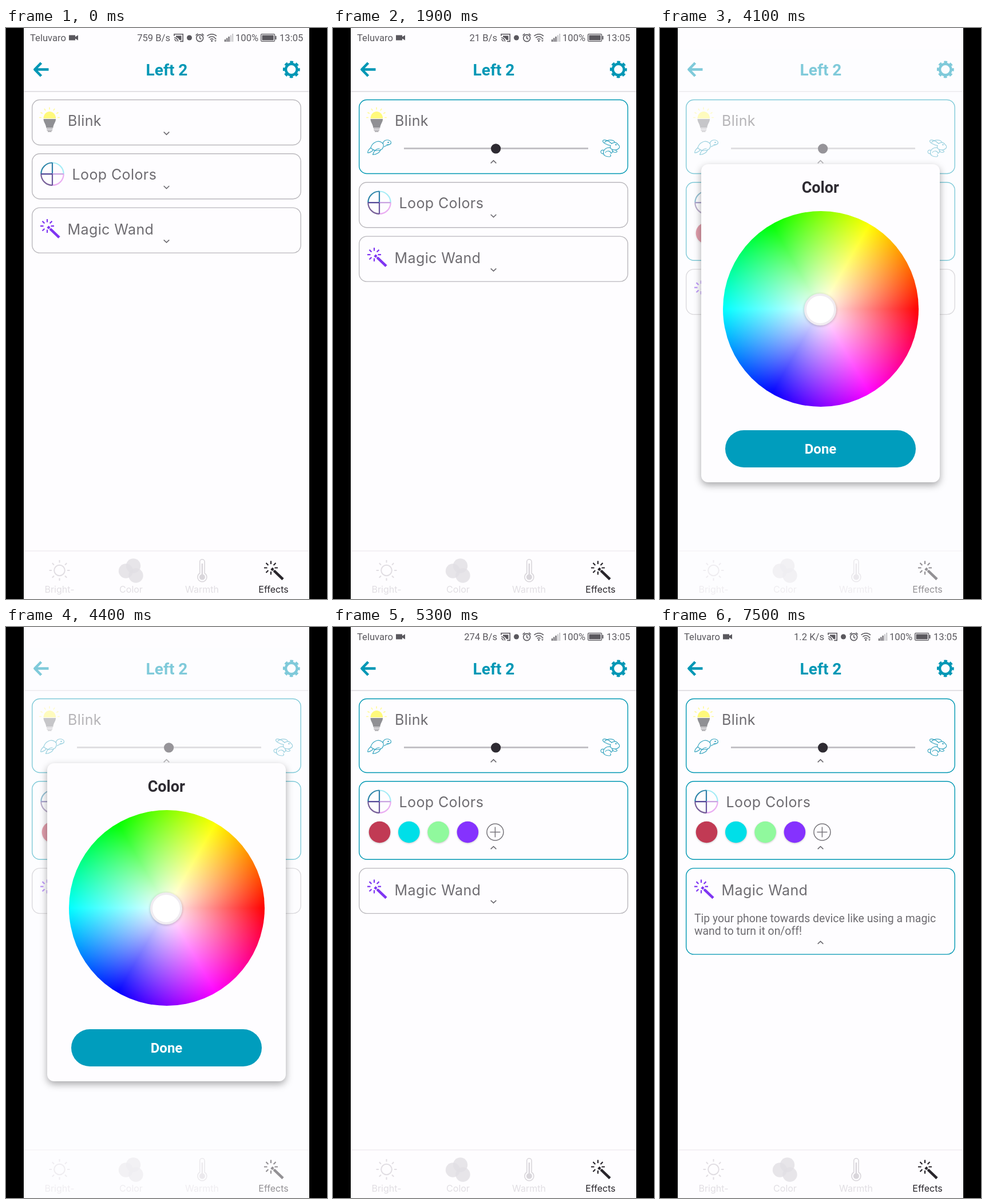
An HTML page that plays this animation: 561x998 px, repeating every 8.6 s.

```html
<!DOCTYPE html>
<html lang="en">
<head>
<meta charset="utf-8">
<title>Light effects</title>
<style>
html, body { margin: 0; width: 100%; height: 100%; overflow: hidden; background: #000; }
#stage { position: absolute; left: 0; top: 0; width: 561px; height: 998px; overflow: hidden; }
svg { position: absolute; left: 0; top: 0; display: block; }
text, #modal { font-family: Roboto, sans-serif; }
.wide { font-family: Inter, sans-serif; }
.line { fill: none; stroke: currentColor; }
.round { stroke-linecap: round; stroke-linejoin: round; }
.title { font-size: 25px; letter-spacing: .4px; fill: #6e6c71; }
.teal { color: #0097b5; }
.off { color: #e1dee3; }
.tab { font-size: 16px; text-anchor: middle; fill: currentColor; }
.bar { font-size: 16.6px; fill: #5a585e; }
#modal { position: absolute; left: 31px; top: 0; width: 499px; height: 998px; background: rgba(254,253,255,.5); }
#modal div { position: absolute; box-sizing: border-box; }
.cover { left: 0; top: 0; width: 499px; height: 36px; background: #fefdff; }
.sheet { left: 41px; top: 238px; width: 416.5px; height: 555.5px; border-radius: 12px; background: #fefdff; box-shadow: 0 5px 13px rgba(0,0,0,.34); }
.head { left: 0; top: 25px; width: 100%; text-align: center; font: bold 27px/32px Roboto, sans-serif; color: #2e2b32; }
.wheel { left: 38px; top: 81.5px; width: 342px; height: 342px; border-radius: 50%;
  background: radial-gradient(circle closest-side, #fff, rgba(255,255,255,0)),
    conic-gradient(from 90deg, #f00, #f0f, #00f, #0ff, #0f0, #ff0, #f00); }
#knob { width: 56px; height: 56px; border-radius: 50%; border: 4px solid #f0ecf1; box-shadow: 0 1px 4px rgba(0,0,0,.25); }
.done { left: 42px; top: 465px; width: 333px; height: 65px; border-radius: 33px; background: #009dbd; color: #fff;
  text-align: center; font: bold 24px/67px Roboto, sans-serif; }
</style>
</head>
<body>
<div id="stage">
<svg width="561" height="998" viewBox="0 0 561 998">
  <defs>
    <g id="wand" class="line">
      <g id="sparks" stroke-width="2.2"></g>
      <path d="M1 1L4 4M5.5 5.2L21 20" stroke-width="4.6"/>
    </g>
  </defs>
  <rect x="31" width="499" height="998" fill="#fefdff"/>

  <g class="bar" color="#5a585e">
    <text x="42" y="23">Teluvaro</text>
    <path d="M110 12.5h11v3l5-3v9l-5-3v3h-11z"/>
    <text id="rate" x="287" y="23" text-anchor="end"></text>
    <path class="line" stroke-width="1.6" d="M294 14v-3.2h15.2v12.6h-5M294 17a6.5 6.5 0 0 1 6.5 6.5M294 20.2a3.4 3.4 0 0 1 3.4 3.4"/>
    <path d="M297 13.5h9.5v7.5h-3.5a9 9 0 0 0-6-5z"/>
    <circle cx="320.5" cy="17" r="4.5"/>
    <g class="line" stroke-width="1.6">
      <circle cx="338.7" cy="17.6" r="6"/>
      <path d="M338.7 14v4l2.7 1.6M331.6 13l3.6-3.2M345.8 13l-3.6-3.2"/>
      <path d="M351.5 14a12 12 0 0 1 16.5 0M354.2 17.2a8 8 0 0 1 11 0M356.8 20.2a4 4 0 0 1 5.8 0"/>
    </g>
    <circle cx="359.7" cy="22.6" r="1.5"/>
    <path d="M366 17l2 2.6h-4zM366 24l2-2.6h-4z"/>
    <path d="M382 20h2v4h-2zM385.3 17.5h2v6.5h-2zM388.6 15h2v9h-2z"/>
    <path d="M391.9 12.5h2v11.5h-2zM395.2 10h2v14h-2z" opacity=".35"/>
    <text x="401" y="23">100%</text>
    <rect class="line" x="445.6" y="10.7" width="24" height="12.6" rx="1.5" stroke-width="1.3"/>
    <path d="M447.5 12.6h20.2v8.8h-20.2zM470.5 14h2v6h-2z"/>
    <text x="478" y="23">13:05</text>
  </g>

  <g class="teal">
    <path class="line" stroke-width="4.6" stroke-linejoin="round" d="M74.5 72.5H51M61.5 61L50.3 72.5L61.5 84"/>
    <text x="281" y="83" text-anchor="middle" font-size="28" font-weight="bold" fill="currentColor">Left 2</text>
    <g class="line" transform="translate(498.8 72.5)">
      <circle r="9.8" stroke-width="4.4"/>
      <circle r="12.8" stroke-width="4.2" stroke-dasharray="5.55 4.5" stroke-dashoffset="2.78"/>
    </g>
  </g>
  <path d="M31 111h499" stroke="#dad8dd" stroke-width="1.6"/>

  <g class="card">
    <rect/>
    <g stroke="#fffa9a" stroke-width="1.6" id="rays" transform="translate(76 31)"></g>
    <path d="M65.5 32.5a10.8 12 0 0 1 21.6 0z" fill="#fff97c"/>
    <path d="M65.5 33.5h21.6c0 6-4.4 9-4.8 15.5h-12c-.4-6.500-4.800-9.500-4.800-15.500z" fill="#909094"/>
    <path d="M71 50.800h10.500M71.500 53.200h9.500M73 55.400h6.500" stroke="#a9a8ac" stroke-width="1.600"/>
    <text class="wide title" x="108" y="45.5">Blink</text>
    <g class="more">
      <path d="M124 85h322" stroke="#c3c1c6" stroke-width="3"/>
      <circle cx="284.6" cy="85.4" r="8.6" fill="#2e2b32"/>
      <g class="line round" color="#3aa6c0" stroke-width="1.2">
        <path d="M66 84C68 75 78 70 85 74.500C89 77 89.500 82 85.500 86.500C79 90 71 89.500 66 84z"/>
        <path d="M66 84c-3 2-5 5-5.500 8.500c4 .5 7-2 9.500-4.500M81 85c-6 1-10 5-11.500 11c7-.5 12-4 14-9"/>
        <path d="M87.500 77c-.5-5 5-7.500 9.500-6.500c4.500 1 5.500 4.500 3.500 6.500c-2.500 2.300-7 2-11 5M94 78c3 1 5 0 7-1"/>
        <circle cx="96.500" cy="74.500" r=".7"/>
      </g>
      <g class="line round" color="#3aa6c0" stroke-width="1.2">
        <path d="M487 76.500C480 70 473 69 471.500 71.500C471 75 478 78.500 485 80M475 74c5-5 15-4.500 17.500 0"/>
        <path d="M487 76.500c4-3 9-2.500 11 1.500c3 2 3.500 5 1.500 7c-3 3-8 3-12 1.500c-3-1-4-4-2.500-6.500"/>
        <path d="M485 84c-6-1.500-12 2-12.500 8c-.5 5 4 7.500 10 7.500c3 0 4-2 2-3.500M473 88c-4-1-6 2-4.500 4.500c1 2 3 2 4.500 1"/>
        <path d="M476 92c3-4 9-3 10 2M487.500 87c1 4 4 6 8 4.500c2-1 .5-3-2-3M486 93c2-.5 3-2 3-4"/>
        <circle cx="494.500" cy="78.500" r=".7"/>
      </g>
    </g>
    <path class="chev"/>
  </g>

  <g class="card">
    <rect/>
    <g class="line" transform="translate(81 35.4)" stroke-width="2.2">
      <path d="M-19.700 0A19.700 19.700 0 0 1 0-19.700" stroke="#2f86aa"/>
      <path d="M0-19.700A19.700 19.700 0 0 1 19.700 0" stroke="#a4ecf6"/>
      <path d="M19.700 0A19.700 19.700 0 0 1 0 19.700" stroke="#eaaef2"/>
      <path d="M0 19.700A19.700 19.700 0 0 1-19.700 0" stroke="#79619a"/>
      <path d="M0-19.700V0" stroke="#2f7ea8"/>
      <path d="M0 0H19.700" stroke="#c7a0e0"/>
      <path d="M0 0V19.700" stroke="#6a579f"/>
      <path d="M-19.700 0H0" stroke="#4c4093"/>
    </g>
    <text class="wide title" x="115.500" y="45.500">Loop Colors</text>
    <g class="more">
      <g id="dots"></g>
      <g id="plus" class="line" color="#77757b" stroke-width="1.5"><circle r="14.500"/><path d="M-9 0H9M0-9V9"/></g>
    </g>
    <path class="chev"/>
  </g>

  <g class="card">
    <rect/>
    <use href="#wand" x="72" y="32" color="#7f35f2"/>
    <text class="wide title" x="107.500" y="47">Magic Wand</text>
    <g class="more" font-size="19.4" fill="#6e6c71">
      <text x="60" y="94">Tip your phone towards device like using a magic</text>
      <text x="60" y="116.500">wand to turn it on/off!</text>
    </g>
    <path class="chev"/>
  </g>

  <path d="M31 914h499" stroke="#efedf1" stroke-width="1.5"/>
  <g class="wide off">
    <g class="line" transform="translate(93.500 948)" stroke-width="2"><circle r="9.300"/><g id="sun"></g></g>
    <g fill="currentColor" fill-opacity=".8">
      <circle cx="209.500" cy="949" r="12.700"/><circle cx="222.500" cy="940" r="12.700"/><circle cx="227" cy="957" r="12.700"/>
    </g>
    <g color="#d9d6db">
      <path class="line" stroke-width="1.600" d="M338.700 953v-20a4.200 4.200 0 0 1 8.400 0v20a8 8 0 1 1-8.400 0z"/>
      <path class="line" stroke-width="2.400" d="M342.900 936v24"/>
      <circle cx="342.900" cy="959.800" r="5" fill="currentColor"/>
    </g>
    <text class="wide tab" x="93.500" y="986.500">Bright-</text>
    <text class="wide tab" x="218.500" y="986.500">Color</text>
    <text class="wide tab" x="342.500" y="986.500">Warmth</text>
    <g color="#28252b">
      <use href="#wand" x="463" y="943.500"/>
      <text class="wide tab" x="467.500" y="986.500">Effects</text>
    </g>
  </g>
</svg>

<div id="modal">
  <div class="cover"></div>
  <div class="sheet">
    <div class="head">Color</div>
    <div class="wheel"></div>
    <div id="knob"></div>
    <div class="done">Done</div>
  </div>
</div>
</div>

<script>
const LOOP = 8600, STEP = 100;
const CARD_TOP = 125.5, CARD_HEIGHT = 79, GAP = 15.3;
const PURPLE = '#8532fe';
const CARDS = [
  { start: 1000, time: 400, extra: 50 },
  { start: 3000, time: 400, extra: 57.5 },
  { start: 6800, time: 500, extra: 71.5 }
];
const $ = id => document.getElementById(id);

// Short radial strokes between two radii.
function spokes(id, from, to, first, count, turn = 45) {
  let d = '';
  for (let i = 0; i < count; i++) {
    const a = (first + i * turn) * Math.PI / 180, c = Math.cos(a), s = Math.sin(a);
    d += `M${c * from} ${s * from}L${c * to} ${s * to}`;
  }
  $(id).innerHTML = `<path d="${d}"/>`;
}
spokes('sparks', 6.5, 12, 90, 8);
spokes('rays', 14, 18, 180, 7, 30);
spokes('sun', 13.5, 18, 0, 8);

const dotX = i => 81.5 + 51.3 * i;
$('dots').innerHTML = ['#c13a54', '#00dfe8', '#90f99d', PURPLE].map((color, i) =>
  `<circle cx="${dotX(i)}" cy="88.700" r="18.800" fill="${color}" style="filter:drop-shadow(0 1.500px 1.500px rgba(0,0,0,.22))"/>`
).join('');
const lastDot = $('dots').lastChild;

const cards = [...document.querySelectorAll('.card')].map((el, i) => ({
  el, ...CARDS[i],
  box: el.querySelector('rect'),
  more: el.querySelector('.more'),
  chev: el.querySelector('.chev')
}));
for (const { box, chev } of cards) {
  for (const [k, v] of Object.entries({ x: 45.7, width: 469.5, rx: 13.5, fill: 'none', 'stroke-width': 1.4 }))
    box.setAttribute(k, v);
  chev.setAttribute('class', 'chev line');
  chev.setAttribute('color', '#6c6a70');
  chev.setAttribute('stroke-width', 1.6);
}

const ease = p => p * p * (3 - 2 * p);
const openness = (t, { start, time }) =>
  t < start ? 0 : ease(Math.min(1, (t - start + STEP) / time));

function drawCards(t) {
  let y = CARD_TOP;
  for (const card of cards) {
    const p = openness(t, card), height = CARD_HEIGHT + card.extra * p;
    card.el.setAttribute('transform', `translate(0 ${y})`);
    card.box.setAttribute('height', height);
    card.box.setAttribute('stroke', p ? '#0097b2' : '#bab8bd');
    card.more.style.opacity = p;
    const dir = p ? -1 : 1, cy = height - 20.5;
    card.chev.setAttribute('d', `M275.700 ${cy - 2.3 * dir}l4.800 ${4.6 * dir}l4.800 ${-4.6 * dir}`);
    y += height + GAP;
  }
  const added = t >= 5100;
  lastDot.style.display = added ? '' : 'none';
  $('plus').setAttribute('transform', `translate(${dotX(added ? 4 : 3) - 3.3} 88.700)`);
}

function drawModal(t) {
  const shown = t < 4100 || t >= 5300 ? 0 : t < 5100 ? 1 : t < 5200 ? .6 : .15;
  $('modal').style.opacity = shown;
  const picked = t >= 4800, knob = $('knob').style;
  knob.left = (picked ? 165 : 180) + 'px';
  knob.top = (picked ? 358 : 225.5) + 'px';
  knob.background = picked ? PURPLE : '#fff';
}

const rate = t => t < 1500 ? '759 B/s' : t < 4500 ? '21 B/s' : t < 7500 ? '274 B/s' : '1.2 K/s';

function draw(t) {
  $('rate').textContent = rate(t);
  drawCards(t);
  drawModal(t);
}

const begin = performance.now();
function tick() {
  const t = (performance.now() - begin) % LOOP;
  draw(Math.floor(t / STEP) * STEP);
  requestAnimationFrame(tick);
}
tick();
</script>
</body>
</html>
```
